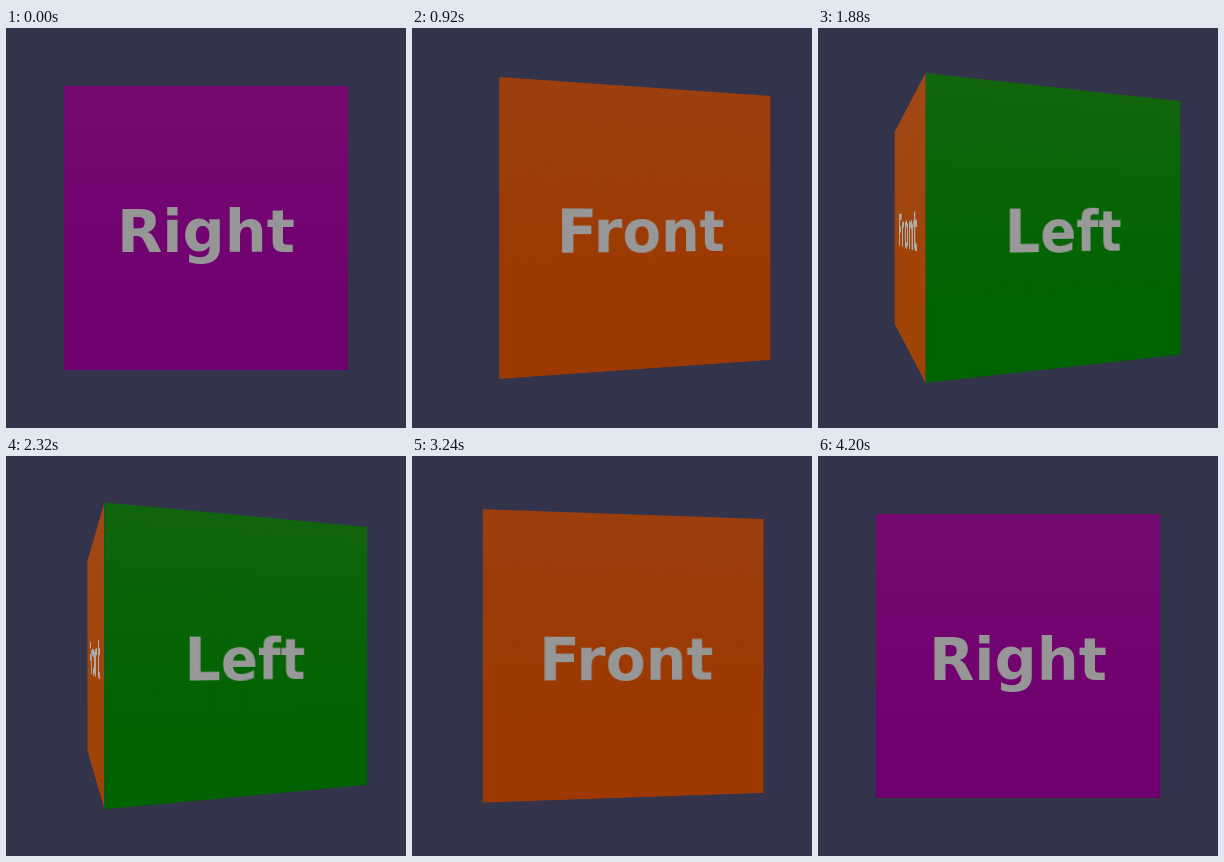
An HTML page that plays this animation: 400 by 400 pixels, repeating every 4.24 s.

```html
<!DOCTYPE html>
<html lang="en">
<head>
<meta charset="utf-8">
<title>Turning cube</title>
<style>
  html, body { margin: 0; width: 100%; height: 100%; overflow: hidden; background: #33334c; }
  #scene { position: absolute; left: 0; top: 0; width: 400px; height: 400px; perspective: 475px; overflow: hidden; }
  #cube { position: absolute; left: 58px; top: 58px; width: 284px; height: 284px; transform-style: preserve-3d; }
  .face {
    position: absolute; width: 284px; height: 284px; overflow: hidden;
    backface-visibility: hidden;
    background-image: linear-gradient(rgba(160, 110, 130, .1), rgba(160, 110, 130, 0) 75%);
    font: bold 59px "DejaVu Sans", sans-serif; line-height: 291px;
    text-align: center; white-space: nowrap;
  }
</style>
</head>
<body>
<div id="scene"><div id="cube"></div></div>
<script>
const HALF = 142, LOOP = 4240, STEP = 40, QUARTER_STEPS = 26, START = 0.8;

// Colours when facing the viewer and when seen edge-on.
const faces = [
  { label: "Right", turn: 0, front: [112, 0, 112], side: [92, 0, 96] },
  { label: "Front", turn: 90, front: [156, 56, 0], side: [160, 68, 8] },
  { label: "Left", turn: 180, front: [0, 97, 0], side: [0, 120, 0] }
];
const ink = { front: [150, 150, 150], side: [174, 174, 172] };

const cube = document.getElementById("cube");
for (const face of faces) {
  face.el = document.createElement("div");
  face.el.className = "face";
  face.el.textContent = face.label;
  face.el.style.transform = `rotateY(${face.turn}deg) translateZ(${HALF}px)`;
  cube.append(face.el);
}

const mix = ({ front, side }, amount) =>
  `rgb(${front.map((c, i) => Math.round(c + (side[i] - c) * amount))})`;

// Each quarter turn starts slightly slowly, then runs evenly.
const ease = u => u - 0.3 * u * (1 - u) ** 8;

function angleAt(ms) {
  const step = Math.floor((ms % LOOP) / STEP);
  const progress = Math.min(4, Math.max(0, (step - START) / QUARTER_STEPS));
  const quarter = Math.floor(progress);
  const travelled = 90 * (quarter + ease(progress - quarter));
  return travelled <= 180 ? travelled : 360 - travelled;
}

function render(ms) {
  const angle = angleAt(ms);
  cube.style.transform = `translateZ(${-HALF}px) rotateY(${-angle}deg)`;
  for (const face of faces) {
    const slant = Math.sin((face.turn - angle) * Math.PI / 180) ** 2;
    face.el.style.backgroundColor = mix(face, slant);
    face.el.style.color = mix(ink, slant);
  }
}

const began = performance.now();
function tick() {
  render(performance.now() - began);
  requestAnimationFrame(tick);
}
tick();
</script>
</body>
</html>
```
